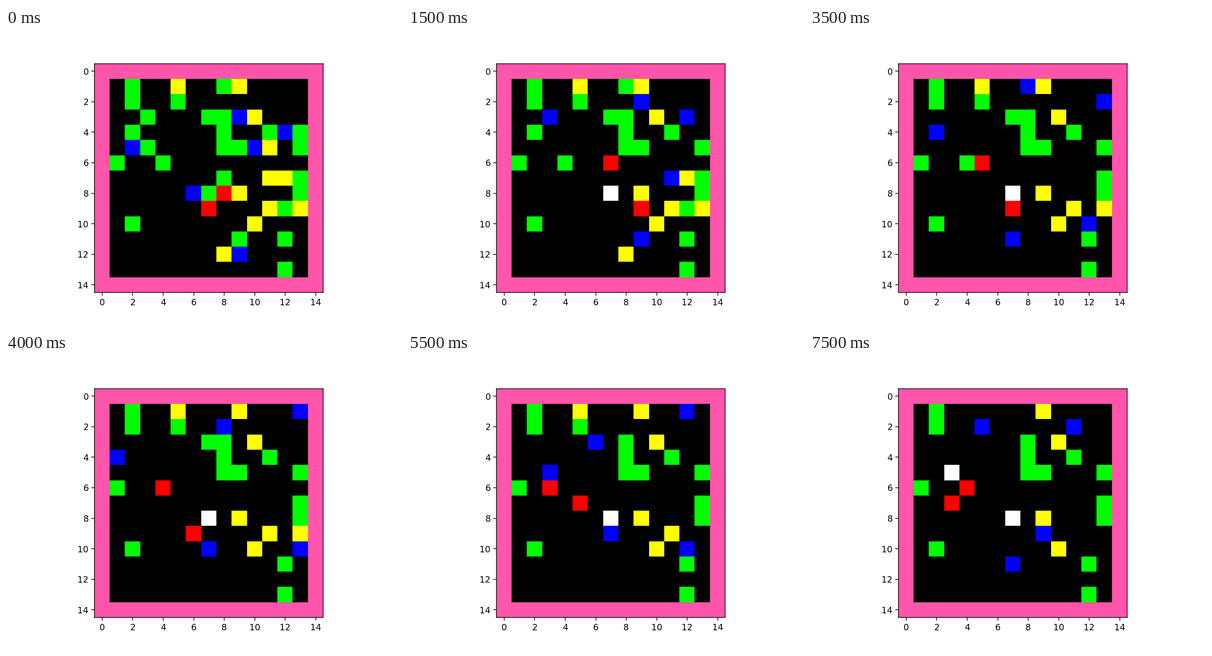
These frames come from a looping animation (864x648 px, 8 s). A matplotlib script:

```python
import numpy as np
import matplotlib.pyplot as plt
from matplotlib.animation import FuncAnimation

SIZE, FRAMES, INTERVAL = 15, 16, 500
WALL, GREEN, YELLOW = (255, 85, 170), (0, 255, 0), (255, 255, 0)
BLUE, RED, DEAD = (0, 0, 255), (255, 0, 0), (255, 255, 255)

# Columns holding food, by row
GREENS = {1: (2, 8), 2: (2, 5), 3: (3, 7, 8), 4: (2, 8, 11, 13),
          5: (3, 8, 9, 13), 6: (1, 4), 7: (8, 13), 8: (7, 13), 9: (12,),
          10: (2,), 11: (9, 12), 13: (12,)}
YELLOWS = {1: (5, 9), 3: (10,), 5: (11,), 7: (11, 12), 8: (9,),
           9: (11, 13), 10: (10,), 12: (8,)}

STEPS = {"U": (0, -1), "D": (0, 1), "L": (-1, 0), "R": (1, 0), ".": (0, 0)}

# Colour, starting cell, moves, turn of death
AGENTS = [
    (BLUE, (2, 5), "RUUDDLULRRD....", 12),
    (BLUE, (9, 3), "ULRLULRDLDLUULD", None),
    (BLUE, (12, 4), "RULUDURU..L..LD", None),
    (BLUE, (10, 5), "RDDRDDDRULDULLL", None),
    (BLUE, (6, 8), "R..............", 1),
    (BLUE, (9, 12), "DUULDLUURLUDDLR", None),
    (RED, (8, 8), "ULULRLLLUDL...D", None),
    (RED, (7, 9), ".RRDULLLUULLLRU", None),
]


def trail(start, moves):
    """Cells visited from the start, one per turn."""
    return np.cumsum([start] + [STEPS[m] for m in moves], axis=0)


def board(turn):
    grid = np.zeros((SIZE, SIZE, 3), np.uint8)
    grid[[0, -1], :] = grid[:, [0, -1]] = WALL
    for food, color in ((GREENS, GREEN), (YELLOWS, YELLOW)):
        for row, cols in food.items():
            grid[row, list(cols)] = color

    walks = [trail(start, moves[:turn]) for _, start, moves, _ in AGENTS]
    for walk in walks:  # food is eaten wherever an agent has been
        grid[walk[:, 1], walk[:, 0]] = 0
    for (color, _, _, death), walk in zip(AGENTS, walks):
        x, y = walk[-1]
        dead = death is not None and turn >= death
        grid[y, x] = DEAD if dead else color
    return grid


fig, ax = plt.subplots(figsize=(6.4, 4.8), dpi=135)
image = ax.imshow(board(0), interpolation="nearest")


def update(turn):
    image.set_data(board(turn))
    return (image,)


anim = FuncAnimation(fig, update, frames=FRAMES, interval=INTERVAL,
                     repeat=True, repeat_delay=0)
plt.show()
```
